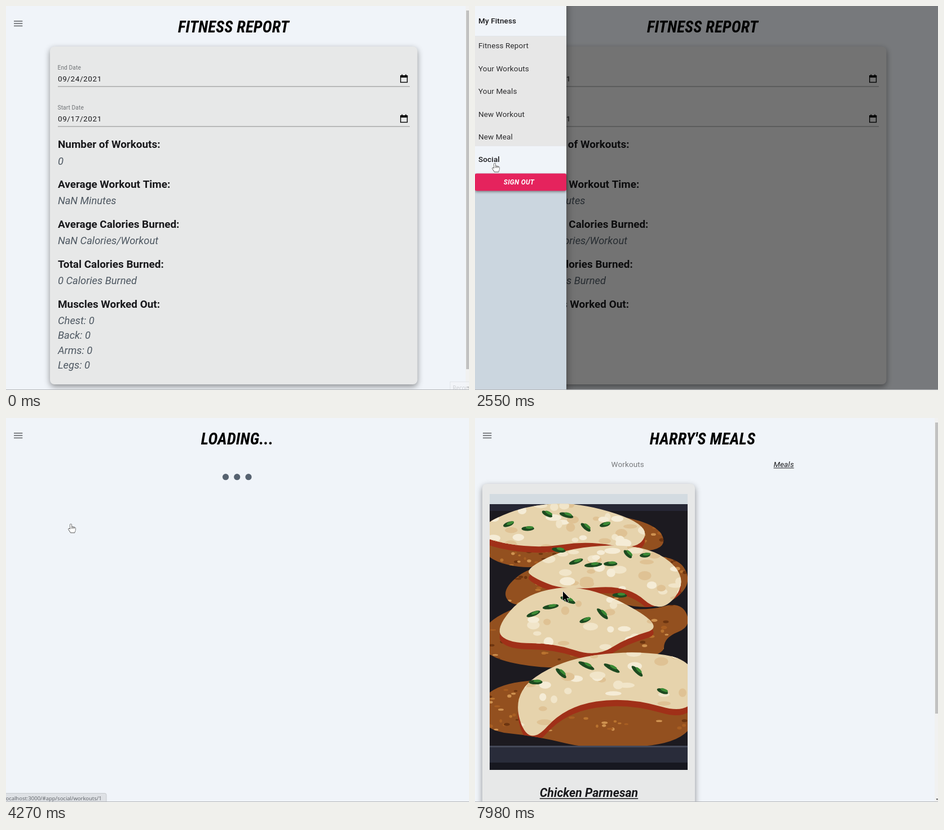
These frames come from a looping animation (821x682 px, 8000 ms). An HTML page with a canvas:

```html
<!DOCTYPE html>
<html lang="en">
<head>
<meta charset="utf-8">
<title>Fitness app walkthrough</title>
<style>
  html, body { margin: 0; width: 100%; height: 100%; overflow: hidden; background: #f0f4f9; }
  canvas { display: block; }
</style>
</head>
<body>
<canvas id="stage" width="821" height="682"></canvas>
<script>
const ctx = document.getElementById('stage').getContext('2d');
const W = 821, H = 682, LOOP = 8000;

const SANS = 'Roboto, sans-serif';
const NARROW = '"Roboto Condensed", Roboto, sans-serif';
const PAGE = '#f0f4f9', CARD = '#e7e8e8', INK = '#18181b', SLATE = '#4d5761', PINK = '#e5235d';

// Moments at which the app reacts to a click
const OPEN = 1505, SOCIAL_TAB = 2495, CLOSE = 3331, PERSON = 4200, LOADED = 4570,
      EXPAND = 5910, MEALS = 7300, MEALS_READY = 7480;

// ---------- timing ----------
const clamp = v => Math.max(0, Math.min(1, v));
const mix = (a, b, p) => a + (b - a) * p;

function bezier(x1, y1, x2, y2) {
  const at = (a, b, s) => 3 * (1 - s) ** 2 * s * a + 3 * (1 - s) * s * s * b + s ** 3;
  return x => {
    if (x <= 0) return 0;
    if (x >= 1) return 1;
    let lo = 0, hi = 1;
    for (let i = 0; i < 24; i++) {
      const mid = (lo + hi) / 2;
      if (at(x1, x2, mid) < x) lo = mid; else hi = mid;
    }
    return at(y1, y2, lo);
  };
}
const easeInOut = bezier(0.4, 0, 0.2, 1);
const easeOut = bezier(0, 0, 0.2, 1);
const sharp = bezier(0.4, 0, 0.6, 1);
const run = (t, start, length, ease = easeInOut) => ease(clamp((t - start) / length));

// ---------- drawing helpers ----------
function rect(x, y, w, h, color) {
  ctx.fillStyle = color;
  ctx.fillRect(x, y, w, h);
}

function panel(x, y, w, h, r, color, blur, drop, alpha) {
  ctx.save();
  ctx.shadowColor = `rgba(0,0,0,${alpha})`;
  ctx.shadowBlur = blur;
  ctx.shadowOffsetY = drop;
  ctx.fillStyle = color;
  ctx.beginPath();
  ctx.roundRect(x, y, w, h, r);
  ctx.fill();
  ctx.restore();
}
const card = (x, y, w, h) => panel(x, y, w, h, 8, CARD, 11, 4, 0.42);

function text(str, x, y, font, color = INK, { align = 'left', spacing = 0, underline = false } = {}) {
  ctx.font = font;
  ctx.fillStyle = color;
  ctx.textAlign = align;
  ctx.letterSpacing = spacing + 'px';
  ctx.fillText(str, x, y);
  if (underline) {
    const w = ctx.measureText(str).width;
    const size = parseFloat(font.match(/([\d.]+)px/)[1]);
    rect(align === 'center' ? x - w / 2 : x, y + size * 0.1, w, Math.max(1, size * 0.07), color);
  }
  ctx.letterSpacing = '0px';
}

// Falls back to a narrowed regular cut when no condensed face is available
const narrowScale = (() => {
  const width = font => { ctx.font = font; return ctx.measureText('FITNESS REPORT').width; };
  const regular = width(`italic bold 29px ${SANS}`);
  return width(`italic bold condensed 29px ${NARROW}`) < regular * 0.95 ? 1 : 0.87;
})();

function title(str, x, y, size = 28.7) {
  ctx.save();
  ctx.translate(x, y);
  ctx.scale(narrowScale, 1);
  text(str, 0, 0, `italic bold condensed ${size}px ${NARROW}`, '#000', { align: 'center', spacing: size * 0.007 });
  ctx.restore();
}

const body = (str, x, y, style = '', color = INK, opts = {}) =>
  text(str, x, y, `${style} 13.5px ${SANS}`, color, { spacing: 0.13, ...opts });
const heading = (str, x, y) => text(str, x, y, `bold 18.9px ${SANS}`);
const value = (str, x, y) => text(str, x, y, `italic 18.35px ${SANS}`, SLATE);

function ellipse(x, y, rx, ry, color, turn = 0) {
  ctx.fillStyle = color;
  ctx.beginPath();
  ctx.ellipse(x, y, rx, ry, turn, 0, Math.PI * 2);
  ctx.fill();
}

// Closed smooth outline guided by a flat list of x, y pairs
function blob(coords) {
  const path = new Path2D(), n = coords.length / 2;
  const at = i => [coords[2 * (i % n)], coords[2 * (i % n) + 1]];
  const middle = i => at(i).map((v, k) => (v + at(i + 1)[k]) / 2);
  path.moveTo(...middle(0));
  for (let i = 1; i <= n; i++) path.quadraticCurveTo(...at(i), ...middle(i));
  path.closePath();
  return path;
}

// ---------- page parts ----------
function menuIcon(t) {
  if (t > 1340 && t < 1800) ellipse(21.5, 31, 20, 20, 'rgba(0,0,0,0.05)');
  for (const y of [26, 30.2, 34.5]) rect(14, y, 15.3, 1.8, '#74777a');
}

function scrollbar(bottom) {
  rect(815, 0, 6, H, '#f1f1f1');
  rect(816, 8, 5, bottom - 8, '#c1c1c1');
  ctx.fillStyle = '#505050';
  ctx.beginPath();
  ctx.moveTo(817.5, 676);
  ctx.lineTo(821, 676);
  ctx.lineTo(819.5, 679);
  ctx.fill();
}

function dateField(label, date, y) {
  text(label, 91.5, y - 15.5, `10.2px ${SANS}`, '#707376', { spacing: 0.1 });
  body(date, 92, y + 5, '', INK, { spacing: 0.6 });
  rect(92, y + 14, 624, 1, '#8a8b8b');
  ctx.strokeStyle = '#000';
  ctx.lineWidth = 1.4;
  ctx.strokeRect(699.7, y - 4.6, 11.8, 11.6);
  rect(699, y - 5, 13.2, 3.6, '#000');
  rect(701.5, y - 7, 1.6, 2.5, '#000');
  rect(708.2, y - 7, 1.6, 2.5, '#000');
}

function reportPage() {
  title('FITNESS REPORT', 403.5, 47);
  card(78, 72, 651.5, 600);
  dateField('End Date', '09/24/2021', 128.5);
  dateField('Start Date', '09/17/2021', 199.5);
  const stats = [
    ['Number of Workouts:', '0'],
    ['Average Workout Time:', 'NaN Minutes'],
    ['Average Calories Burned:', 'NaN Calories/Workout'],
    ['Total Calories Burned:', '0 Calories Burned'],
    ['Muscles Worked Out:'],
  ];
  stats.forEach(([name, amount], i) => {
    heading(name, 92, 252 + i * 70.9);
    if (amount) value(amount, 92, 281.5 + i * 70.9);
  });
  ['Chest', 'Back', 'Arms', 'Legs'].forEach((m, i) => value(m + ': 0', 92, 565 + i * 26.35));
}

function socialPage() {
  title('SOCIAL', 403.5, 47);
  card(78, 72, 651.5, 576);
  body('Muriel', 106, 158);
  rect(92, 170, 625, 1, '#c9caca');
  ['Harry', 'Ada', 'Tim', 'Mr. Boo'].forEach((name, i) => body(name, 106, 193.5 + i * 32.4));
}

function loadingPage() {
  title('LOADING...', 410, 47);
  for (const x of [389.5, 409.7, 430]) ellipse(x, 104.7, 5.6, 5.6, '#566270');
}

function tab(label, x, y, active) {
  body(label, x, y, active ? 'italic' : '', active ? INK : '#77797c', { align: 'center', underline: active });
}

function workoutsPage(t) {
  title("HARRY'S WORKOUTS", 410.7, 40, 20.2);
  tab('Workouts', 276, 78.5, true);
  tab('Meals', 556.5, 78.5, false);
  const bottom = mix(422, 502, run(t, EXPAND, 250));
  card(13, 109, 385, bottom - 109);
  text('Fri, Sep 24th, 2021', 27, 150, `italic 22.4px ${SANS}`);
  const rows = [
    ['Workout Length:', '60 Minutes', 193.5],
    ['Calories:', '160 Calories Burned', 264.5],
    ['Muscles Worked Out:', 'Chest, Back, Arms, Legs', 335.5],
    ['Details:', 'I did a full body workout!', 445],
  ];
  text('Expand for Details', 205, 407.5, `11px ${SANS}`, '#8f9091', { align: 'center' });
  ctx.save();
  ctx.beginPath();
  ctx.rect(13, 109, 385, bottom - 109);
  ctx.clip();
  for (const [name, amount, y] of rows) {
    heading(name, 26.5, y);
    value(amount, 26.5, y + 29.2);
  }
  ctx.restore();
}

// Breaded cutlets from back to front, each with the area of its topping
const cutlets = [
  { crust: [10, 180, 120, 160, 320, 180, 345, 240, 200, 232, 110, 272, 10, 250],
    cheese: [10, 190, 90, 155, 190, 150, 310, 190, 290, 235, 200, 218, 110, 232, 10, 215],
    top: [145, 187, 95, 22] },
  { crust: [45, 305, 110, 255, 350, 235, 390, 295, 320, 345, 200, 315, 70, 340],
    cheese: [88, 268, 170, 228, 310, 225, 380, 285, 330, 350, 270, 296, 160, 306, 105, 285],
    top: [225, 255, 85, 22] },
  { crust: [10, 365, 110, 320, 300, 345, 365, 325, 385, 370, 335, 390, 335, 425, 150, 450, 10, 425],
    cheese: [35, 375, 90, 310, 200, 295, 340, 370, 270, 390, 215, 425, 140, 400, 60, 400],
    top: [180, 345, 85, 32] },
  { crust: [10, 485, 110, 460, 390, 470, 390, 575, 210, 590, 110, 565, 10, 555],
    cheese: [65, 490, 150, 430, 280, 412, 395, 430, 390, 530, 270, 495, 160, 512, 95, 585],
    top: [220, 462, 125, 26] },
].map(c => ({ top: c.top, crust: blob(c.crust), cheese: blob(c.cheese) }));

function paint(path, color, dy = 0) {
  ctx.save();
  ctx.translate(0, dy);
  ctx.fillStyle = color;
  ctx.fill(path);
  ctx.restore();
}

function speckle(path, [x, y, rx, ry], count, size, colors, random) {
  ctx.save();
  ctx.clip(path);
  for (let i = 0; i < count; i++) {
    const px = x + (random() - 0.5) * rx * 4, py = y + (random() - 0.4) * ry * 6;
    ellipse(px, py, size * (0.6 + random()), size * (0.4 + random() * 0.5), colors[i % colors.length]);
  }
  ctx.restore();
}

function cutlet({ crust, cheese, top }, random) {
  paint(crust, '#93501f');
  speckle(crust, top, 170, 3.5, ['#b9732f', '#6d3510', '#a85e22', '#cf9250'], random);
  ctx.save();
  ctx.clip(crust);
  paint(cheese, '#a03018', 11);
  ctx.restore();
  paint(cheese, '#e6d3ac');
  speckle(cheese, top, 60, 9, ['#f1e5c9', '#dfc294', '#f5ecd6'], random);
  const [x, y, rx, ry] = top;
  for (let i = 0; i < 6; i++) {
    const lx = x + (i - 2.5) * rx * 0.36, ly = y + (random() - 0.5) * ry * 2, turn = random() * 1.2 - 0.4;
    ellipse(lx, ly, 9 + random() * 7, 4, '#1d4a20', turn);
    ellipse(lx + 3, ly - 2, 7, 2.5, '#3c8a35', turn);
  }
}

function mealPhoto() {
  let seed = 11;
  const random = () => (seed = (seed * 16807) % 2147483647) / 2147483647;
  ctx.save();
  ctx.beginPath();
  ctx.rect(26, 135, 351, 490);
  ctx.clip();
  rect(26, 135, 351, 490, '#1c1a20');
  rect(26, 135, 351, 18, '#d3dbe1');
  rect(26, 153, 351, 12, '#262735');
  for (const c of cutlets) cutlet(c, random);
  rect(26, 582, 351, 43, '#292c3a');
  rect(26, 582, 351, 3, '#444858');
  rect(26, 612, 351, 13, '#171820');
  ctx.restore();
}

function mealsPage() {
  title("HARRY'S MEALS", 403.5, 47);
  tab('Workouts', 270.7, 87, false);
  tab('Meals', 547.5, 87, true);
  card(13, 117, 377, 640);
  mealPhoto();
  text('Chicken Parmesan', 202, 673, `italic bold 21.3px ${SANS}`, INK, { align: 'center', underline: true });
}

// ---------- drawer ----------
function drawer(t) {
  const shown = t < CLOSE ? run(t, OPEN, 225, easeOut) : 1 - run(t, CLOSE, 195, sharp);
  const shade = t < CLOSE ? run(t, OPEN, 225) : 1 - run(t, CLOSE, 195);
  if (shade > 0) rect(0, 0, t < CLOSE ? W : 815, H, `rgba(0,0,0,${shade * 0.5})`);
  if (shown <= 0) return;

  // 0 = "My Fitness" unfolded, 1 = "Social" unfolded
  const swap = (delay, opening, closing) =>
    t < CLOSE ? run(t, SOCIAL_TAB + delay, opening) : 1 - run(t, CLOSE, closing);
  const fitHead = mix(55, 40.5, swap(0, 300, 150));
  const fitBody = 203 * (1 - swap(0, 480, 480));
  const socialHead = mix(40.5, 55, swap(0, 150, 150));
  const socialBody = 41 * swap(55, 245, 245);
  const socialY = fitHead + fitBody;
  const partnersY = socialY + socialHead;
  const signY = partnersY + socialBody;

  ctx.save();
  ctx.translate((shown - 1) * 162, 0);
  panel(0, -10, 162, H + 20, 0, '#cbd6df', 14, 3, 0.45);
  rect(0, 0, 162, fitHead, PAGE);
  body('My Fitness', 6, fitHead / 2 + 4.7, '500');

  ctx.save();
  ctx.beginPath();
  ctx.rect(0, fitHead, 162, fitBody);
  ctx.clip();
  rect(0, fitHead, 162, fitBody, '#e7e7e7');
  ['Fitness Report', 'Your Workouts', 'Your Meals', 'New Workout', 'New Meal']
    .forEach((item, i) => body(item, 6, fitHead + 21.7 + i * 40.5, '', '#2b2b2d'));
  ctx.restore();

  rect(0, socialY, 162, socialHead, PAGE);
  body('Social', 6, socialY + socialHead / 2 + 4, '500');

  ctx.save();
  ctx.beginPath();
  ctx.rect(0, partnersY, 162, socialBody);
  ctx.clip();
  body('Partners', 6, partnersY + 21.7, '', '#2b2b2d');
  ctx.restore();

  panel(0, signY, 162, 30.8, 3, PINK, 4, 2, 0.4);
  text('SIGN OUT', 78, signY + 19.6, `italic bold 11.9px ${SANS}`, '#fff', { align: 'center', spacing: 0.3 });
  ctx.restore();
}

// ---------- browser chrome and pointer ----------
function statusBar(t) {
  const hovers = [
    [3030, 3640, 270, ''],
    [3880, 4620, 178, '/workouts/1'],
    [7170, 7640, 166, '/meals/1'],
  ];
  for (const [from, to, width, path] of hovers) {
    if (t < from || t > to) continue;
    ctx.save();
    ctx.globalAlpha = clamp((to - t) / 100);
    ctx.fillStyle = '#dee1e5';
    ctx.strokeStyle = '#c6c9cd';
    ctx.lineWidth = 1;
    ctx.beginPath();
    ctx.roundRect(-5, 666.5, width + 5, 20, 3);
    ctx.fill();
    ctx.stroke();
    text('localhost:3000/#app/social' + path, -3, 679, '9.5px "Open Sans", sans-serif', '#5c6066');
    ctx.restore();
  }
}

function recordHint(t) {
  ctx.save();
  ctx.globalAlpha = 0.6 * clamp(1 - (t - 70) / 150);
  rect(787, 667, 34, 15, '#f3f5f8');
  ctx.strokeStyle = '#d9dcdf';
  ctx.lineWidth = 1;
  ctx.strokeRect(787.5, 667.5, 40, 20);
  text('Record', 792, 682, '10px "Open Sans", sans-serif', '#b4b7bb');
  ctx.restore();
}

const pointerPath = [
  [70, 806, 655], [820, 43, 114], [890, 42, 112], [1240, 22, 38], [1500, 23, 40], [2130, 25, 45],
  [2210, 26, 48], [2480, 35, 279], [2620, 35, 279], [2960, 31, 150], [3060, 28, 113], [3380, 28, 113],
  [3790, 100, 172], [4000, 115, 188], [4400, 115, 188], [4680, 158, 188], [4960, 275, 200],
  [5160, 272, 202], [5600, 214, 398], [5790, 228, 394], [6350, 230, 390], [6550, 258, 366],
  [7100, 538, 92], [7260, 552, 76], [7400, 552, 76], [7910, 149, 297], [7980, 156, 308],
];
const handTimes = [[1200, 1500], [1650, 3450], [3850, 4560], [5500, 6300], [7130, 7480]];

function pointerAt(t) {
  const i = pointerPath.findIndex(k => k[0] > t);
  if (i < 0) return pointerPath.at(-1).slice(1);
  const [t0, x0, y0] = pointerPath[i - 1], [t1, x1, y1] = pointerPath[i];
  const p = clamp((t - t0) / (t1 - t0));
  const s = p * p * (3 - 2 * p);
  return [mix(x0, x1, s), mix(y0, y1, s)];
}

const arrow = new Path2D('M0 0V16.5L3.8 13L6.6 19.2L9.3 18L6.6 12H11.5Z');
const hand = new Path2D('M-1.2 1.2Q0 -.8 1.2 1.2V5.6Q2.6 4.6 3.6 6Q5 5 6 6.6Q7.6 5.8 8 7.6V10.6' +
  'Q8 13 6.4 15.6H-.4Q-1.6 13 -3.6 10.8Q-4.8 9 -3.4 8.4Q-2.2 8.4 -1.2 9.8Z');

function pointer(t) {
  if (t < 70) return;
  const isHand = handTimes.some(([a, b]) => t >= a && t < b);
  const shape = isHand ? hand : arrow;
  ctx.save();
  ctx.translate(...pointerAt(t));
  ctx.lineJoin = 'round';
  ctx.lineWidth = 1.1;
  ctx.strokeStyle = isHand ? '#222' : '#fff';
  ctx.fillStyle = isHand ? '#fff' : '#000';
  ctx.stroke(shape);
  ctx.fill(shape);
  if (isHand) {
    ctx.beginPath();
    for (const x of [1.2, 3.6, 6]) {
      ctx.moveTo(x, 5.8);
      ctx.lineTo(x, 8.6);
    }
    ctx.lineWidth = 0.8;
    ctx.stroke();
  }
  ctx.restore();
}

// ---------- scene ----------
function draw(t) {
  rect(0, 0, W, H, PAGE);
  menuIcon(t);
  if (t < CLOSE) reportPage();
  else if (t < PERSON) socialPage();
  else if (t < LOADED) loadingPage();
  else if (t < MEALS) workoutsPage(t);
  else if (t < MEALS_READY) loadingPage();
  else mealsPage();

  drawer(t);
  if (t < OPEN) scrollbar(645);
  else if (t >= CLOSE && t < PERSON) scrollbar(665);
  else if (t >= MEALS_READY) scrollbar(525);

  recordHint(t);
  statusBar(t);
  rect(0, 681, W, 1, '#b3b5b8');
  pointer(t);
}

const begin = performance.now();
function tick() {
  draw((performance.now() - begin) % LOOP);
  requestAnimationFrame(tick);
}
tick();
</script>
</body>
</html>
```
